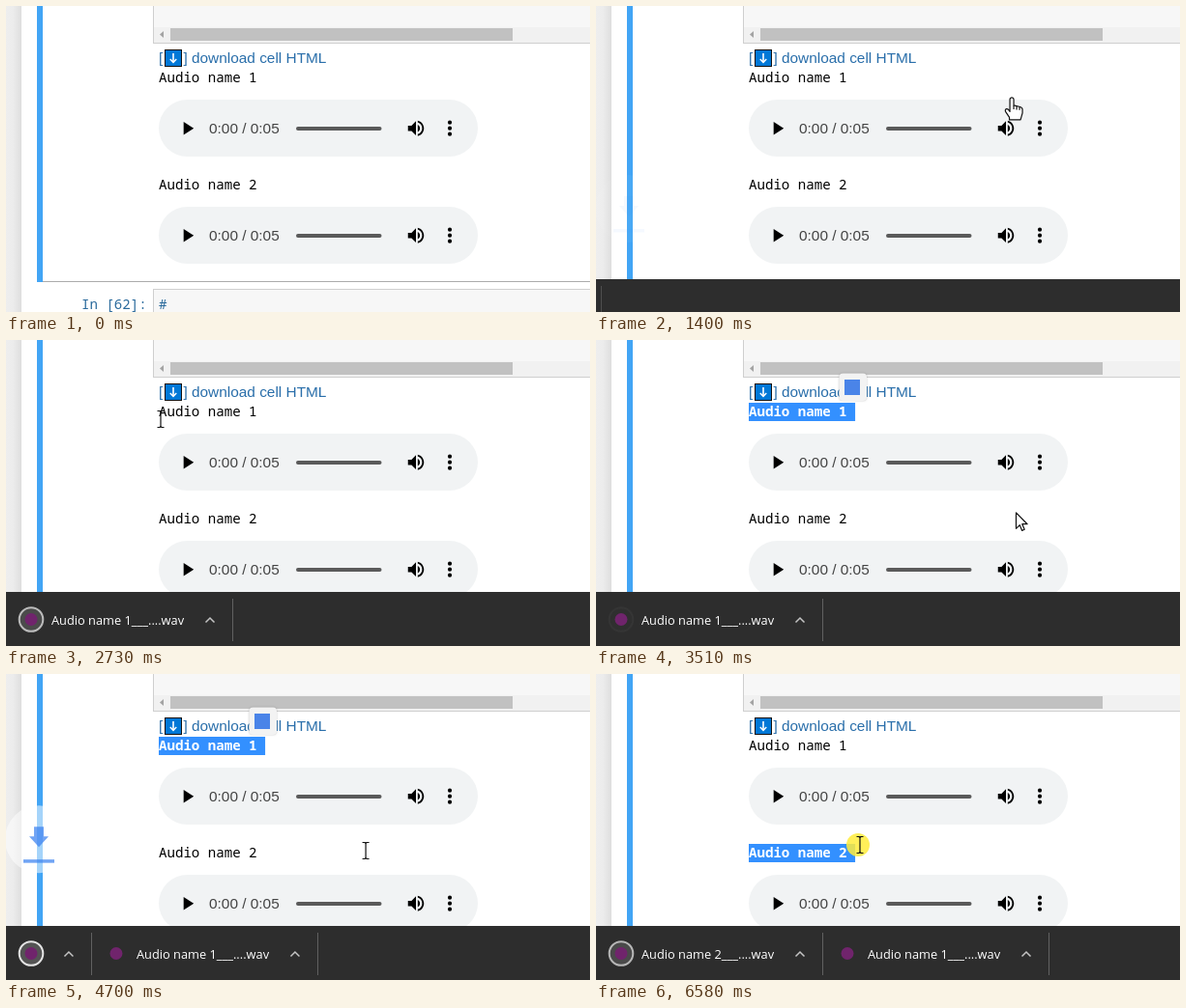
These frames come from a looping animation (604x317 px, 6660 ms). An HTML page with a canvas:

```html
<!DOCTYPE html>
<html lang="en">
<head>
<meta charset="utf-8">
<title>Audio downloads</title>
<style>
html, body { margin: 0; width: 604px; height: 317px; overflow: hidden; background: #fff; }
canvas { display: block; }
</style>
</head>
<body>
<canvas id="stage" width="604" height="317"></canvas>
<script>
const ctx = document.getElementById('stage').getContext('2d');
const W = 604, H = 317, LOOP = 6660, STEP = 78.5, FIRST = 140;
const BAR_H = 56, ITEM_W = 234, CHAR_W = 8.467;
const MONO = '14.11px "Noto Sans Mono", monospace';
const SANS = '15.4px "Liberation Sans", Arial, sans-serif';
const MENU = '13.2px Roboto, sans-serif';
const SHELF = '12.8px "Open Sans", sans-serif';

// time, x, y, pointer shape from then on
const moves = [
  [140, 492, 243, 'arrow'], [460, 463, 128, 'arrow'], [690, 463, 128, 'arrow'],
  [770, 458, 118, 'hand'], [1000, 437, 82, 'hand'], [1320, 437, 83, 'hand'],
  [1400, 430, 95, 'arrow'], [1880, 177, 258, 'arrow'], [2040, 120, 286, 'arrow'],
  [2190, 105, 288, 'arrow'], [2600, 158, 95, 'ibeam'], [2730, 160, 82, 'ibeam'],
  [2810, 160, 80, 'ibeam'], [3120, 269, 76, 'ibeam'], [3250, 271, 76, 'arrow'],
  [3430, 422, 152, 'arrow'], [3660, 462, 238, 'arrow'], [3830, 462, 238, 'hand'],
  [4060, 442, 202, 'hand'], [4140, 441, 200, 'hand'], [4210, 438, 198, 'arrow'],
  [4540, 385, 184, 'ibeam'], [4700, 372, 183, 'ibeam'], [4860, 368, 186, 'arrow'],
  [5400, 95, 294, 'arrow'], [5560, 92, 294, 'arrow'], [5880, 160, 187, 'ibeam'],
  [6270, 270, 178, 'ibeam'], [6570, 273, 177, 'ibeam']
];
const presses = [[520, 680], [1230, 1330], [2800, 3140], [3650, 3760], [3970, 4070], [5870, LOOP]];
const menus = [{ open: 680, fade: 1330, close: 1390, y: 40 }, { open: 3740, fade: 4120, close: 4210, y: 151 }];
const flights = [{ start: 1388, floor: 317 }, { start: 4550, floor: 262 }];
const items = [
  { start: 1388, done: 1440, text: 'Audio name 1___....wav' },
  { start: 4525, done: 4680, text: 'Audio name 2___....wav' }
];

const volume = new Path2D('M3 9v6h4l5 5V4L7 9H3zm13.5 3c0-1.77-1.02-3.29-2.5-4.03v8.05c1.48-.73 2.5-2.25 2.5-4.02zM14 3.23v2.06c2.89.86 5 3.54 5 6.71s-2.11 5.85-5 6.71v2.06c4.01-.91 7-4.49 7-8.77s-2.99-7.86-7-8.77z');
const play = new Path2D('M8 5v14l11-7z');
const save = new Path2D('M19 9h-4V3H9v6H5l7 7 7-7zM5 18v2h14v-2H5z');
const shapes = {
  arrow: new Path2D('M0 0V16.5L3.8 12.9 6.2 18.6 8.7 17.5 6.3 11.9H11.6Z'),
  hand: new Path2D('M-2 2a2 2 0 0 1 4 0V8l6.5 1.6q2.5.6 2.5 3V16l-2 7H-2.5v-2.5L-6.5 14.5q-.8-2.2 1-2.8 1.2-.2 2.2 1L-2 14.5Z'),
  knuckles: new Path2D('M2 8v4M5 9v3.5M8 9.8v3'),
  ibeam: new Path2D('M-3.5-8.5H-1L0-7.5 1-8.5H3.5M0-7.5V7.5M-3.5 8.5H-1L0 7.5 1 8.5H3.5')
};

const clamp = v => Math.max(0, Math.min(1, v));
const smooth = v => v * v * (3 - 2 * v);
const easeOut = v => 1 - (1 - v) ** 2;
const within = (t, a, b) => t >= a && t < b;

function rect(x, y, w, h, fill) {
  ctx.fillStyle = fill;
  ctx.fillRect(x, y, w, h);
}

function round(x, y, w, h, r, fill) {
  ctx.fillStyle = fill;
  ctx.beginPath();
  ctx.roundRect(x, y, w, h, r);
  ctx.fill();
}

function disc(x, y, r, fill) {
  ctx.fillStyle = fill;
  ctx.beginPath();
  ctx.arc(x, y, r, 0, 7);
  ctx.fill();
}

function line(points, color, width) {
  ctx.strokeStyle = color;
  ctx.lineWidth = width;
  ctx.beginPath();
  points.forEach(([x, y]) => ctx.lineTo(x, y));
  ctx.stroke();
}

function poly(points, fill) {
  ctx.fillStyle = fill;
  ctx.beginPath();
  points.forEach(([x, y]) => ctx.lineTo(x, y));
  ctx.fill();
}

function label(text, x, y, font, fill) {
  ctx.font = font;
  ctx.fillStyle = fill;
  ctx.fillText(text, x, y);
}

function icon(path, cx, cy, size, fill) {
  ctx.save();
  ctx.translate(cx - size / 2, cy - size / 2);
  ctx.scale(size / 24, size / 24);
  ctx.fillStyle = fill;
  ctx.fill(path);
  ctx.restore();
}

function pointerAt(t) {
  if (t < moves[0][0]) return null;
  let i = moves.length - 1;
  while (moves[i][0] > t) i--;
  const a = moves[i], b = moves[i + 1] || a;
  const k = a === b ? 0 : smooth((t - a[0]) / (b[0] - a[0]));
  return { x: a[1] + (b[1] - a[1]) * k, y: a[2] + (b[2] - a[2]) * k, kind: a[3] };
}

function drawPage() {
  rect(0, 0, W, H, '#fff');
  const edge = ctx.createLinearGradient(0, 0, 16, 0);
  edge.addColorStop(0, '#eeeeee');
  edge.addColorStop(0.45, '#ececec');
  edge.addColorStop(1, '#dedede');
  rect(0, 0, 16, H, edge);

  rect(152, 0, 452, 39, '#cfcfcf');
  rect(153, 0, 451, 22, '#f7f7f7');
  rect(153, 22, 451, 16, '#f1f1f1');
  rect(170, 23, 354, 13, '#c1c1c1');
  poly([[163, 26], [163, 33], [159, 29.5]], '#a3a3a3');

  rect(32, 285, 572, 1, '#ababab');
  rect(32, 0, 6, 286, '#42a5f5');
  label('[', 158, 59, SANS, '#296eaa');
  rect(164, 45, 18, 18, '#111');
  rect(165, 46, 16, 16, '#0078d7');
  line([[173, 49], [173, 58]], '#fff', 1.6);
  line([[169.8, 55], [173, 58.4], [176.2, 55]], '#fff', 1.5);
  label(']', 183.5, 59, SANS, '#296eaa');
  label('download cell HTML', 192, 59, SANS, '#296eaa');

  label('In [62]:', 78, 314, MONO, '#2a6a9c');
  rect(152, 293, 452, 24, '#cfcfcf');
  rect(153, 294, 451, 23, '#f7f7f7');
  label('#', 158, 314, MONO, '#2a6a9c');
}

function drawPlayer(y) {
  const mid = y + 29.7;
  round(158, y, 330, 59, 29.5, '#f1f3f4');
  icon(play, 187.5, mid, 23, '#000');
  label('0:00 / 0:05', 210, y + 35, SANS, '#444');
  round(300, y + 28, 88.5, 4, 2, '#5a5a5a');
  icon(volume, 424, mid, 22, '#000');
  for (const d of [-6, 0, 6]) disc(459, mid + d, 2.1, '#000');
}

function drawName(text, y, chars) {
  label(text, 158, y, MONO, '#000');
  if (chars <= 0) return;
  const w = chars * CHAR_W;
  rect(158, y - 14, w, 19, '#3390ff');
  ctx.save();
  ctx.beginPath();
  ctx.rect(158, y - 14, w, 19);
  ctx.clip();
  label(text, 158, y, 'bold ' + MONO, '#fff');
  ctx.restore();
}

function selected(t, from, to, end, p) {
  if (!within(t, from, end)) return 0;
  return t > to ? 13 : Math.max(0, Math.min(13, Math.round((p.x - 158) / CHAR_W)));
}

function drawMenu(m, t, p) {
  const fading = t >= m.fade, y = m.y;
  ctx.save();
  ctx.shadowColor = 'rgba(0,0,0,.4)';
  ctx.shadowBlur = 7;
  ctx.shadowOffsetY = 1;
  round(253, y, 220, 100, 2, '#fff');
  ctx.restore();
  const row = fading ? 1 : Math.floor((p.y - y) / 50);
  if (row === 0 || row === 1) rect(253, y + row * 50, 220, 50, fading ? '#f3f3f3' : '#e4e4e2');

  const soft = fading ? '#b8b8b8' : '#8c8c8c';
  icon(save, 278, y + 25.5, 23.5, fading ? '#3f4f41' : '#2c2c2c');
  ctx.letterSpacing = '0.13px';
  label('Download', 302.5, y + 30, MENU, fading ? '#777' : '#333');
  label('Playback speed', 302.5, y + 80, MENU, soft);
  ctx.letterSpacing = '0px';

  const cy = y + 75;
  ctx.strokeStyle = soft;
  ctx.lineWidth = 1.9;
  ctx.beginPath();
  ctx.arc(278, cy, 8.6, -1.45, 1.45);
  ctx.stroke();
  for (let i = 0; i < 4; i++) {
    const a = 1.7 + i * 0.75;
    ctx.beginPath();
    ctx.arc(278, cy, 8.6, a, a + 0.55);
    ctx.stroke();
  }
  poly([[276, cy - 4.2], [276, cy + 4.2], [281.8, cy]], soft);
}

function elide(text, room) {
  ctx.font = SHELF;
  const fits = s => ctx.measureText(s).width <= room;
  if (fits(text)) return text;
  for (let n = text.indexOf('.'); n > 0; n--) {
    const s = text.slice(0, n) + '...';
    if (fits(s)) return s;
  }
  return '';
}

function drawItem(item, x, y, w, t) {
  const cx = x + 26, cy = y + 28.5;
  const p = (t - item.done) / 2500;
  ctx.save();
  ctx.beginPath();
  ctx.rect(x, y, w + 1, BAR_H);
  ctx.clip();
  if (p >= 0 && p < 1) {
    ctx.save();
    ctx.globalAlpha = Math.cos(p * 11 * Math.PI) / 2 + 0.5;
    disc(cx, cy, 12, '#555');
    ctx.strokeStyle = '#e6e6e6';
    ctx.lineWidth = 2;
    ctx.beginPath();
    ctx.arc(cx, cy, 12.3, 0, 7);
    ctx.stroke();
    ctx.restore();
  }
  disc(cx, cy, 6.5, '#70246c');
  label(elide(item.text, w - 95), x + 47, y + 34, SHELF, '#fff');
  const c = x + w - 23;
  line([[c - 4.5, y + 31.5], [c, y + 27], [c + 4.5, y + 31.5]], '#c4c4c4', 1.5);
  rect(Math.round(x + w), y + 7, 1, 44, '#616161');
  ctx.restore();
}

function drawShelf(t) {
  if (t < items[0].start) return;
  const y = H - Math.round(BAR_H * easeOut(clamp((t - 1340) / 150)));
  rect(0, y, W, BAR_H, '#2d2d2d');
  let x = 0;
  for (const item of [...items].reverse()) {
    if (t < item.start) continue;
    const w = ITEM_W * easeOut(clamp((t - item.start) / 800));
    drawItem(item, x, y, w, t);
    x += w;
  }
}

// download badge sinking to the page floor, strongest halfway
function drawFlight(f, t) {
  const c = (t - f.start) / 600;
  if (c <= 0 || c >= 1) return;
  const y = f.floor - 108 + 72 * c;
  ctx.save();
  ctx.globalAlpha = 1 - 4 * (c - 0.5) ** 2;
  disc(34, y, 35, 'rgba(255,255,255,.72)');
  const blue = '#3b82f0';
  poly([[29, y - 13], [39, y - 13], [39, y - 3], [44, y - 3], [34, y + 8], [24, y - 3], [29, y - 3]], blue);
  rect(18, y + 21, 32, 3.5, blue);
  ctx.restore();
}

function drawTranslate() {
  ctx.save();
  ctx.shadowColor = 'rgba(0,0,0,.25)';
  ctx.shadowBlur = 2;
  round(251.5, 34.5, 28.5, 28.5, 4, '#f3f3f3');
  ctx.restore();
  rect(257, 41, 16, 16, '#4a84e8');
}

function drawPointer(p) {
  ctx.save();
  ctx.translate(p.x, p.y);
  ctx.lineJoin = 'round';
  if (p.kind === 'ibeam') {
    ctx.strokeStyle = '#111';
    ctx.lineWidth = 1.2;
    ctx.stroke(shapes.ibeam);
  } else {
    ctx.fillStyle = '#fff';
    ctx.strokeStyle = '#111';
    ctx.lineWidth = 1.2;
    ctx.fill(shapes[p.kind]);
    ctx.stroke(shapes[p.kind]);
    if (p.kind === 'hand') ctx.stroke(shapes.knuckles);
  }
  ctx.restore();
}

function draw(ms) {
  const t = ms < FIRST ? 0 : FIRST + Math.floor((ms - FIRST) / STEP + 0.1) * STEP;
  const p = pointerAt(t);
  drawPage();
  drawPlayer(97);
  drawPlayer(208);
  drawName('Audio name 1', 79, selected(t, 2800, 3120, 5870, p));
  drawName('Audio name 2', 190, selected(t, 5870, 6260, LOOP, p));
  if (within(t, 3200, 5870)) drawTranslate();
  menus.filter(m => within(t, m.open, m.close)).forEach(m => drawMenu(m, t, p));
  drawShelf(t);
  flights.forEach(f => drawFlight(f, t));
  if (!p) return;
  if (presses.some(([a, b]) => within(t, a, b))) disc(p.x - 2, p.y, 12, 'rgba(255,236,60,.85)');
  drawPointer(p);
}

const begin = performance.now();
function tick() {
  draw((performance.now() - begin) % LOOP);
  requestAnimationFrame(tick);
}
tick();
</script>
</body>
</html>
```
